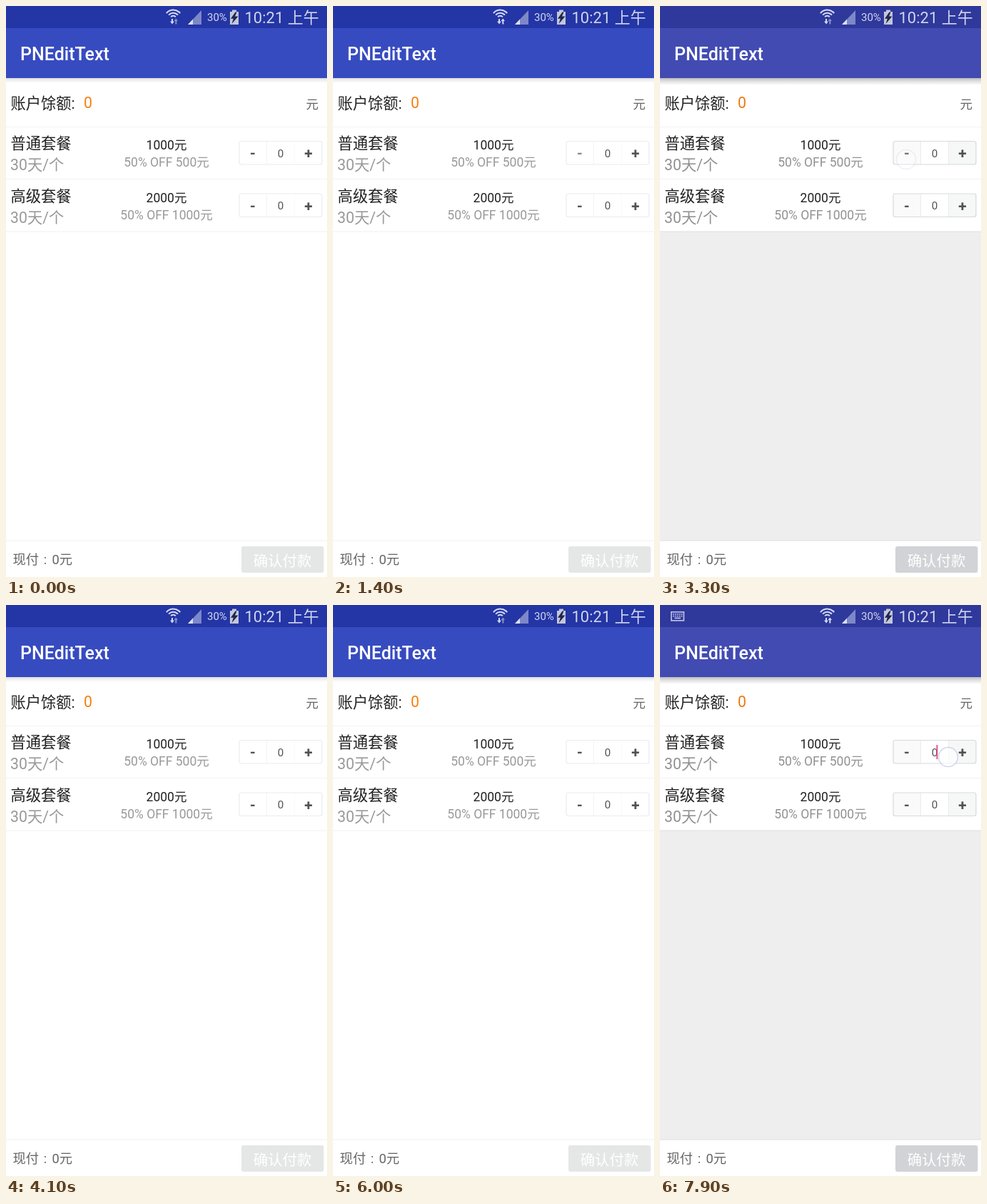
An HTML page with a canvas that plays this animation: 450 px wide and 800 px high, repeating every 8000 ms.

```html
<!DOCTYPE html>
<html lang="zh-CN">
<head>
<meta charset="utf-8">
<title>PNEditText</title>
<style>
html, body { margin: 0; width: 100%; height: 100%; overflow: hidden; background: #fff; }
canvas { display: block; width: 450px; height: 800px; }
</style>
</head>
<body>
<canvas id="stage"></canvas>
<script>
const LOOP = 8000;
const canvas = document.getElementById('stage');
const ctx = canvas.getContext('2d');
const dpr = window.devicePixelRatio || 1;
canvas.width = 450 * dpr;
canvas.height = 800 * dpr;

const SANS = 'Roboto, "Noto Sans CJK SC", "Noto Sans CJK", sans-serif';

const LIGHT = {
  status: '#2435a5', bar: '#374bc0', shadow: 0.13, depth: 7, body: '#ffffff',
  line: '#f3f3f3', edge: '#f1f1f1', border: '#eaecee', divider: '#f1f2f4',
  left: '#ffffff', right: '#ffffff', button: '#e5e7e6', sub: '#999999', orange: '#f57f0b'
};
const GREY = {
  status: '#2f389b', bar: '#414bb2', shadow: 0.26, depth: 10, body: '#eeeeee',
  line: '#f2f2f2', edge: '#dfdfdf', border: '#d6d9db', divider: '#e9ebed',
  left: '#fafafa', right: '#f6f7f7', button: '#d2d3d7', sub: '#919191', orange: '#ee760c'
};

const MINUS = 346, PLUS = 424;
// Touch marks: place, start, end, strength
const taps = [
  { x: 346, y: 216, from: 1100, to: 1400, alpha: 0.9 },
  { x: 346, y: 216, from: 2100, to: 2500, alpha: 1 },
  { x: 345, y: 215, from: 3200, to: 3500, alpha: 0.3 },
  { x: 424, y: 214, from: 4700, to: 5000, alpha: 0.9 },
  { x: 404, y: 213, from: 7700, to: 8000, alpha: 0.85 }
];

const within = (t, a, b) => t >= a && t < b;

function rect(x, y, w, h, color) {
  ctx.fillStyle = color;
  ctx.fillRect(x, y, w, h);
}

function text(str, x, y, size, color, align = 'left', weight = 400) {
  ctx.font = `${weight} ${size}px ${SANS}`;
  ctx.textAlign = align;
  ctx.fillStyle = color;
  ctx.fillText(str, x, y);
}

function poly(points, color) {
  ctx.beginPath();
  points.forEach(([x, y]) => ctx.lineTo(x, y));
  ctx.closePath();
  ctx.fillStyle = color;
  ctx.fill();
}

function roundBox(x, y, w, h, r) {
  ctx.beginPath();
  ctx.roundRect(x, y, w, h, r);
}

function keyboard() {
  const ink = '#c2c6e4';
  ctx.strokeStyle = ink;
  ctx.lineWidth = 1.6;
  ctx.strokeRect(15.8, 9.8, 17.6, 12);
  for (let row = 0; row < 2; row++)
    for (let col = 0; col < 5; col++) rect(18 + col * 2.9, 12 + row * 2.8, 1.8, 1.6, ink);
  rect(20.5, 17.6, 8.5, 1.6, ink);
}

function wifi(active) {
  const ink = '#d3d9f0';
  ctx.strokeStyle = ink;
  ctx.lineWidth = 2;
  for (const r of [4.3, 8.3, 12.5]) {
    ctx.beginPath();
    ctx.arc(234.5, 18, r, -Math.PI * 0.78, -Math.PI * 0.22);
    ctx.stroke();
  }
  poly([[230, 21.5], [236, 21.5], [233, 25.5]], ink);
  rect(232, 18, 2, 4, ink);
  const up = active ? ink : '#8791cc';
  poly([[235.5, 21], [241, 21], [238.2, 17.5]], up);
  rect(237.3, 20.5, 2, 5, up);
}

function battery() {
  rect(317, 5.5, 6, 3, '#c3c7da');
  rect(314, 8, 12, 18, '#c3c7da');
  poly([[321.5, 8.5], [315, 17.8], [318.8, 17.8], [316.5, 25], [325.5, 14.5], [321, 14.5], [323.5, 8.5]], '#20264f');
}

function statusBar(t, p) {
  rect(0, 0, 450, 31, p.status);
  if (t >= 7700) keyboard();
  wifi(within(t, 900, 1900) || within(t, 6300, LOOP));
  poly([[274, 6], [274, 26], [255, 26]], '#7d88c8');
  poly([[262, 18.6], [262, 26], [255, 26]], '#dce0f3');
  text('30%', 282, 21, 15, '#d3d7ec');
  battery();
  text('10:21 上午', 334.5, 24, 22, '#d0d5ec');
}

function appBar(p) {
  const g = ctx.createLinearGradient(0, 101, 0, 101 + p.depth);
  g.addColorStop(0, `rgba(0,0,0,${p.shadow})`);
  g.addColorStop(0.45, `rgba(0,0,0,${p.shadow * 0.45})`);
  g.addColorStop(1, 'rgba(0,0,0,0)');
  rect(0, 101, 450, p.depth, g);
  rect(0, 31, 450, 70, p.bar);
  text('PNEditText', 20, 76, 25, '#ffffff', 'left', 500);
}

function stepper(y, p, minusInk, plusInk) {
  rect(328, y, 37, 32, p.left);
  rect(404, y, 39, 32, p.right);
  rect(365, y, 1, 32, p.divider);
  rect(404, y, 1, 32, p === GREY ? p.divider : '#fafafa');
  ctx.strokeStyle = p.border;
  ctx.lineWidth = 1.2;
  roundBox(327, y - 0.5, 116, 32.5, 3);
  ctx.stroke();
  text('-', MINUS, y + 23.4, 20, minusInk, 'center', 700);
  text('0', 385, y + 21.5, 15.2, '#555555', 'center');
  text('+', PLUS, y + 23.2, 21, plusInk, 'center', 700);
}

function plan(dy, name, price, offer, p, minusInk, plusInk) {
  text(name, 6.5, 200 + dy, 21.25, '#222222');
  text('30天/个', 6, 230 + dy, 21.25, p.sub);
  text(price, 225, 201 + dy, 17.5, '#222222', 'center');
  text(offer, 225, 225 + dy, 17.5, p.sub, 'center');
  stepper(190 + dy, p, minusInk, plusInk);
}

function payBar(p) {
  rect(0, 748.5, 450, 1, p.edge);
  text('现付', 9.5, 781.5, 18.3, '#666666');
  text(':', 55, 781.5, 18.3, '#666666', 'center');
  text('0元', 64.5, 781.5, 18.3, '#666666');
  roundBox(330, 757, 115.5, 37, 3);
  ctx.fillStyle = p.button;
  ctx.fill();
  text('确认付款', 387.5, 784.5, 20.4, '#ffffff', 'center');
}

function touch(t) {
  for (const tap of taps) {
    if (!within(t, tap.from, tap.to)) continue;
    ctx.globalAlpha = tap.alpha;
    ctx.beginPath();
    ctx.arc(tap.x, tap.y, 13.5, 0, Math.PI * 2);
    ctx.fillStyle = 'rgba(255,255,255,0.7)';
    ctx.fill();
    ctx.strokeStyle = '#c9d2e5';
    ctx.lineWidth = 1.6;
    ctx.stroke();
    ctx.globalAlpha = 1;
  }
}

function draw(t) {
  const p = within(t, 3000, 4000) || t >= 7500 ? GREY : LIGHT;
  const ink = '#525252';
  const minusInk = within(t, 1100, 1800) ? '#8c8c8c' : within(t, 2100, 2500) ? '#aebbd2' : ink;
  const plusInk = within(t, 4700, 5400) ? '#8c8c8c' : within(t, 6600, 7300) ? '#6c6c6c' : ink;

  ctx.setTransform(dpr, 0, 0, dpr, 0, 0);
  rect(0, 0, 450, 800, '#ffffff');
  rect(0, 316, 450, 433, p.body);
  statusBar(t, p);
  appBar(p);

  text('账户馀额:', 6.5, 144, 21.25, '#222222');
  text('0', 109, 143, 21.25, p.orange);
  text('元', 438, 144, 17.5, '#666666', 'right');
  for (const y of [169, 242]) rect(0, y, 450, 1, p.line);
  rect(0, 315.5, 450, 1, p.edge);

  plan(0, '普通套餐', '1000元', '50% OFF 500元', p, minusInk, plusInk);
  plan(73.5, '高级套餐', '2000元', '50% OFF 1000元', p, ink, ink);
  if (t >= 7600) rect(387.5, 196, 1.8, 20, '#e8488c');
  touch(t);
  payBar(p);
}

const start = performance.now();
function frame() {
  draw((performance.now() - start) % LOOP);
  requestAnimationFrame(frame);
}
frame();
</script>
</body>
</html>
```
